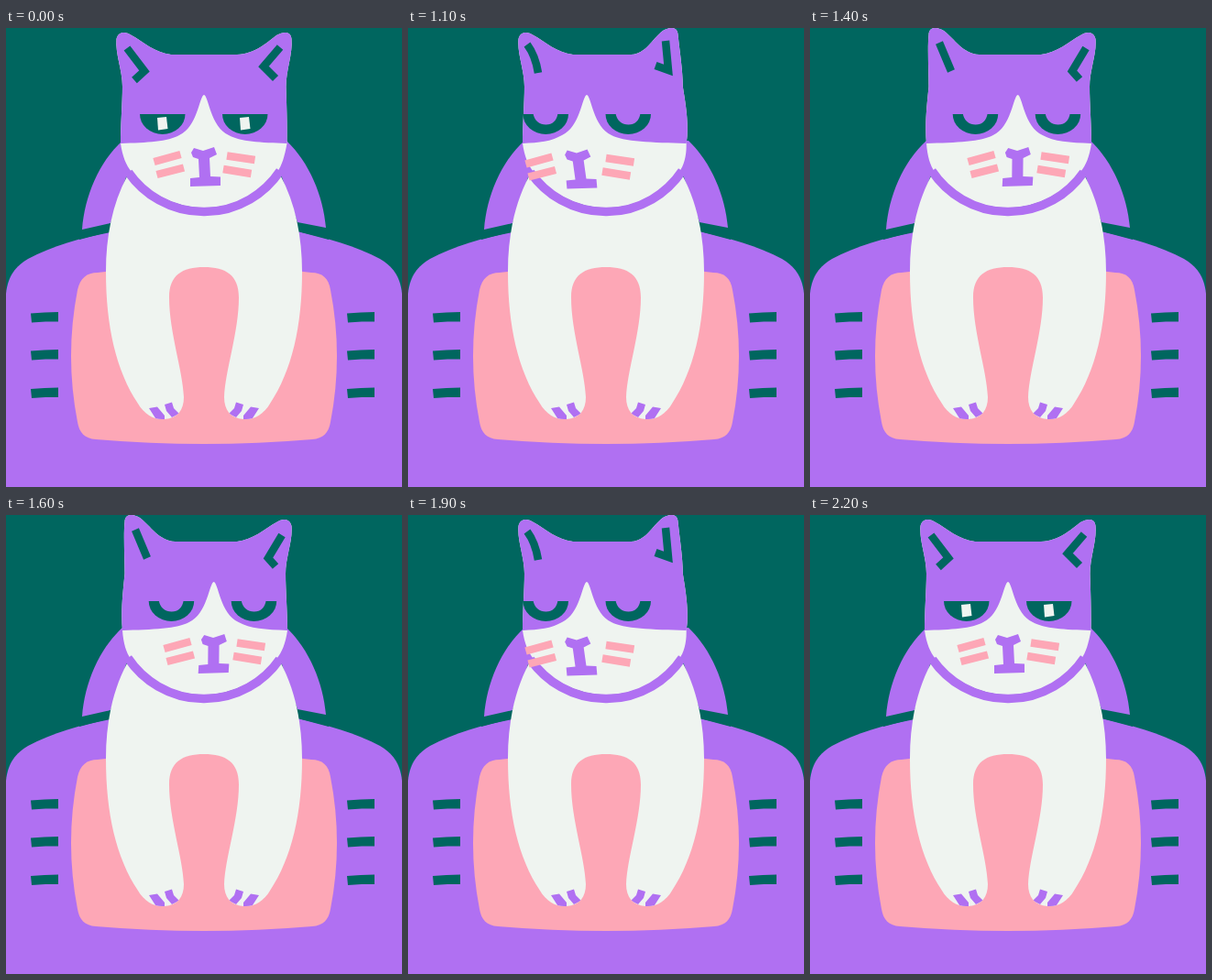
Recreate the animation shown at these times as an HTML page. Size 432x501 px, loop 3200 ms.

```html
<!DOCTYPE html>
<html lang="en">
<head>
<meta charset="utf-8">
<title>Sleepy cat</title>
<style>
  html, body { margin: 0; height: 100%; overflow: hidden; background: #00665f; }
  svg { display: block; width: 100%; height: 100%; }
  .purple { fill: #b070f2; }
  .teal { fill: #00665f; }
  .white { fill: #eff4f0; }
  .pink { fill: #fda7b6; }
  .line { fill: none; stroke-width: 8.5; }
  .ear { stroke: #00665f; }
  .whisker { stroke: #fda7b6; }
  .collar { stroke: #b070f2; stroke-width: 9.5; }
</style>
</head>
<body>
<svg viewBox="0 0 432 501">
  <defs>
    <clipPath id="body">
      <path id="torso" d="M132 162C116 192 109 228 109 266C109 325 120 374 144 410C151 422 162 428 173 427C187 426 194 417 194 403C193 374 178 332 178 294C178 270 192 261 216 261S254 270 254 294C254 332 239 374 238 403C238 417 245 426 259 427C270 428 281 422 288 410C312 374 323 325 323 266C323 228 316 192 299 160Q216 240 132 162Z"/>
    </clipPath>
    <path id="dash" d="M0 1.500L15 .5L30 0V10.500H16L1 11.500Z"/>
    <path id="claws" d="M156 415L165 413.500L173 423V429H165ZM173 411L181 408.500L183 415L189 421L181 425L175 418Z"/>
  </defs>
  <path class="purple" d="M0 501V290C2 270 11 260 24 252C50 238 82 229 114 223L216 212L318 222C350 229 382 238 408 252C421 260 430 270 432 290V501Z"/>
  <path class="teal" d="M80 221L114 213H318L352 219V231L318 222H114L80 231Z"/>
  <path class="purple" d="M83 220C86 183 101 147 127 123H306C331 147 346 183 349 218L318 212L300 160H132L114 213Z"/>
  <path class="pink" d="M78 286C81 273 88 267 100 267Q216 252 333 267C345 267 352 273 354 286Q368 358 354 430C352 442 346 448 334 449Q216 459 98 449C86 448 80 442 78 430Q64 358 78 286Z"/>
  <g id="dashes" class="teal"></g>
  <use href="#torso" class="white"/>
  <g clip-path="url(#body)" class="purple">
    <use href="#claws"/>
    <use href="#claws" transform="translate(432 0) scale(-1 1)"/>
  </g>
  <g id="head"></g>
</svg>
<script>
const $ = id => document.getElementById(id);
const path = (cls, d) => `<path class="${cls}" d="${d}"/>`;
const move = (x, y, inner) => `<g transform="translate(${x} ${y})">${inner}</g>`;

// Part offsets for the head facing forward, half turned and fully turned to the left.
const POSES = [
  { eye: 0, cap: 0, nose: 0, skew: 0, near: 0, far: 0, dy: 0, ex: 0, ey: 0,
    ears: 'M132 22L151 47L140 57M299 21L281 42L294 55' },
  { eye: -9.7, cap: -10.7, nose: -9, skew: .06, near: -11, far: -11, dy: 0, ex: -9, ey: -5,
    ears: 'M131 22L146 47L138 56M291 16L278 47' },
  { eye: -20.5, cap: -21, nose: -28, skew: .09, near: -33, far: -25, dy: 2.5, ex: -17, ey: -5,
    ears: 'M130 18Q139 30 142 49M281 14L284 46L270 41' }
];

// Head turn for each 100 ms of the nod; positive turns go right.
const START = 1000, STEP = 100, LOOP = 3200;
const TURNS = [-1, -2, -1, 0, 1, 2, 1, 0, -1, -2, -2, -1];

const OPEN = 0, HALF = 1, CLOSED = 2;
const PUPIL = path('white', 'M165 98L175 97L176.500 110L166 111.500Z');
const EYES = [
  PUPIL,
  PUPIL + path('purple', 'M156 93H185L182 100.500H159Z'),
  path('purple', 'M157 93H184C183 101 178 105.500 171 105.500S158 101 157 93Z')
].map(inner => path('teal', 'M146 94H195.500A24.750 22 0 0 1 146 94Z') + inner);

const NOSE = path('purple', 'M202 136L205 131L215 134L227 130L230 138L222 142L223 162L234 162.500L234 172L201 173L201 164L211 163L210 143L204 141Z');

function outline({ cap: c, ex, ey, ears }) {
  const at = (x, y) => `${x + ex} ${y + ey} `;
  const cheek = 306.5 + ex / 6;
  const top = `M125 126C125 105 127 82 127 64C127 46 119 28 120.500 12C122 4 130 3 137 8
    C150 15 162 27 180 29H${252 + ex / 2}
    C${272 + ex * .7} 28 ${at(283, 17)}${at(295, 8)}
    C${at(304, 3)}${at(311, 4)}${at(311.5, 12)}
    C${at(313, 28)}${305.5 + ex / 3} 46 ${305.5 + ex / 3} 64
    C${306 + ex / 5} 82 307 105 ${cheek} 126`;
  const brow = `C${278 + c / 2} 125 ${255 + c} 124 ${243 + c} 117
    C${223 + c} 108 ${221 + c} 74 ${216 + c} 73C${211 + c} 74 ${209 + c} 108 ${189 + c} 117
    C${177 + c} 124 ${154 + c / 2} 125 125 126Z`;
  return path('white', `${top}C304 140 301 150 296 157A100 100 0 0 1 137 157C131 150 127 140 125 126Z`) +
    path('purple', top + brow) +
    path('line collar', 'M133.500 157.500A100 100 0 0 0 299 156') +
    path('line ear', ears);
}

function draw(turn, lid) {
  const p = POSES[Math.abs(turn)];
  const side = turn > 0 ? -1 : 1;
  const [left, right] = side > 0 ? [p.near, p.far] : [-p.far, -p.near];
  const skew = p.skew * side;
  $('head').innerHTML =
    `<g transform="translate(${side < 0 ? 432 : 0} 0) scale(${side} 1)">${outline(p)}</g>` +
    move(p.eye * side, 0, EYES[lid] + move(90, 0, EYES[lid])) +
    move(p.nose * side, p.dy, `<g transform="matrix(1 0 ${skew} 1 ${-skew * 168} 0)">${NOSE}</g>`) +
    move(left, p.dy, path('line whisker', 'M161.500 146L190.500 138M164.500 160L194 152.500')) +
    move(right, p.dy, path('line whisker', 'M241 139.500L271.500 144M237 154L267.500 159'));
}

$('dashes').innerHTML = [27, 372].map(x => [310, 351, 392.5].map(y =>
  `<use href="#dash" x="${x}" y="${y}"/>`).join('')).join('');

let shown;
function frame(now) {
  const i = Math.floor((now % LOOP - START) / STEP);
  const moving = i >= 0 && i < TURNS.length;
  const step = moving ? i : -1;
  if (step !== shown) {
    shown = step;
    const drowsy = i === 0 || i === TURNS.length - 1;
    draw(moving ? TURNS[i] : 0, !moving ? OPEN : drowsy ? HALF : CLOSED);
  }
  requestAnimationFrame(frame);
}
frame(0);
</script>
</body>
</html>
```
